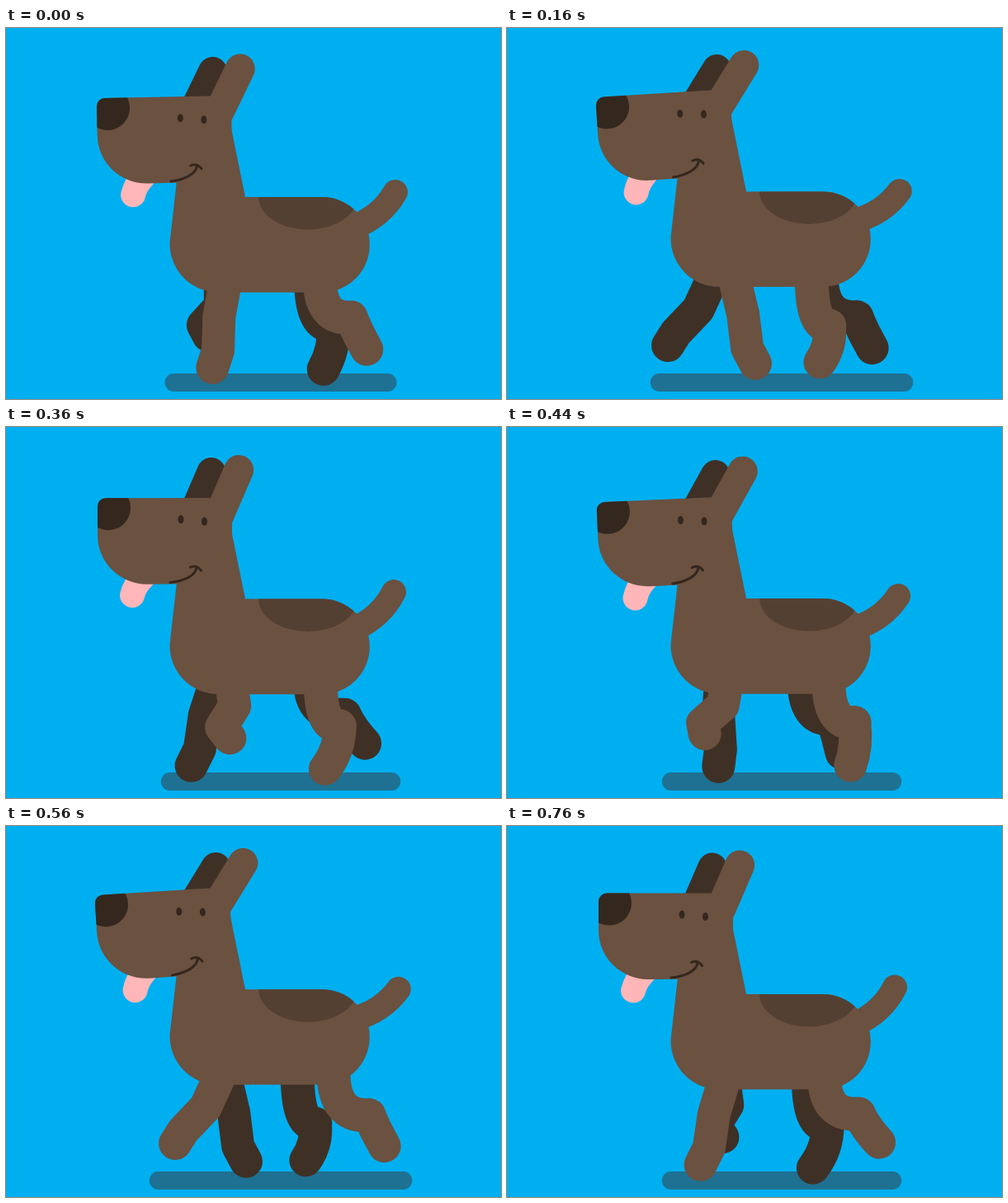
Write an HTML page with a canvas that moves like this. It is 600 by 450 pixels and loops after 800 ms.

```html
<!DOCTYPE html>
<html lang="en">
<head>
<meta charset="utf-8">
<title>Walking dog</title>
<style>
  html, body { margin: 0; width: 100%; height: 100%; overflow: hidden; background: #00aff0; }
  canvas { display: block; }
</style>
</head>
<body>
<canvas id="stage" width="600" height="450"></canvas>
<script>
const ctx = document.getElementById('stage').getContext('2d');
const LOOP = 800, STEP = 40, RAD = Math.PI / 180;
const SKY = '#00aff0', SHADOW = '#1e7192', COAT = '#6b5140', FAR = '#3f3026',
      PATCH = '#544032', INK = '#34271e', TONGUE = '#ffb6b8';

// Cosine that reaches its top when the gait phase, in degrees, equals `peak`.
const wave = (phase, peak) => Math.cos((phase - peak) * RAD);

function stroke(color, width, build) {
  ctx.beginPath();
  build();
  ctx.strokeStyle = color;
  ctx.lineWidth = width;
  ctx.lineCap = ctx.lineJoin = 'round';
  ctx.stroke();
}

function fill(color, build) {
  ctx.beginPath();
  build();
  ctx.fillStyle = color;
  ctx.fill();
}

function ellipse(color, x, y, rx, ry) {
  fill(color, () => ctx.ellipse(x, y, rx, ry, 0, 0, 2 * Math.PI));
}

function within(build, draw) {
  ctx.save();
  ctx.beginPath();
  build();
  ctx.clip();
  draw();
  ctx.restore();
}

function placed(x, y, degrees, draw) {
  ctx.save();
  ctx.translate(x, y);
  ctx.rotate(degrees * RAD);
  draw();
  ctx.restore();
}

// Every joint swings on its own ellipse; `tuck` folds the leg twice per stride.
function frontLeg(color, phase, lift) {
  const tuck = 3 * wave(2 * phase, 216);
  stroke(color, 40, () => {
    ctx.moveTo(270, 290 + lift);
    ctx.lineTo(264 + 25.7 * wave(phase, 103), 344 + 6.5 * wave(phase, 10));
    ctx.lineTo(253 + 39 * wave(phase, 84), 378 + 16 * wave(phase, 18) + tuck);
    ctx.lineTo(253 + 51.4 * wave(phase, 93), 395 + 20 * wave(phase, 15) + tuck);
  });
}

function hindLeg(color, phase, lift) {
  const hipX = 383 + 14 * wave(phase, 259);
  const hockX = 415.5 + 27 * wave(phase, 276), hockY = 356 + 8.6 * wave(phase, 125);
  const pawX = 419 + 51 * wave(phase, 291);
  const pawY = 398 + 17.7 * wave(phase, 133) + 5 * wave(2 * phase, 40);
  const length = Math.hypot(pawX - hockX, pawY - hockY);
  const dx = (pawX - hockX) / length, dy = (pawY - hockY) / length;
  const bow = 5 - 14 * dx;
  stroke(color, 41, () => {
    ctx.moveTo(hipX, 308 + lift);
    ctx.quadraticCurveTo(hipX, hockY + 3, hockX, hockY);
  });
  stroke(color, 40, () => {
    ctx.moveTo(hockX, hockY);
    ctx.quadraticCurveTo((hockX + pawX) / 2 + dy * bow, (hockY + pawY) / 2 - dx * bow, pawX, pawY);
  });
}

function bodyPath() {
  ctx.moveTo(290, 208.5);
  ctx.lineTo(383, 208.5);
  ctx.arc(383, 266.3, 57.8, -Math.PI / 2, Math.PI / 2);
  ctx.lineTo(258, 324.1);
  ctx.bezierCurveTo(223, 324, 198, 296, 198.5, 264);
  ctx.lineTo(207, 188);
  ctx.lineTo(225, 150);
  ctx.lineTo(268, 105);
  ctx.lineTo(271, 115);
  ctx.closePath();
}

function headPath() {
  ctx.moveTo(111, 96);
  ctx.arcTo(111, 86, 121, 86, 10);
  ctx.lineTo(274, 86);
  ctx.lineTo(274, 130);
  ctx.lineTo(262, 160);
  ctx.lineTo(240, 190);
  ctx.lineTo(171, 190.5);
  ctx.bezierCurveTo(138, 190.5, 111, 164, 111, 131);
  ctx.closePath();
}

function ear(color, x, y, width, nod) {
  placed(x, y, 23.3 + 3.3 * nod, () => stroke(color, width, () => {
    ctx.moveTo(0, 0);
    ctx.lineTo(0, -61);
  }));
}

function head(nod) {
  placed(243, 149, -nod, () => {
    ctx.translate(-243, -149);
    ear(FAR, 224.7, 110.5, 35, nod);
    stroke(TONGUE, 30, () => {
      ctx.moveTo(153, 204);
      ctx.quadraticCurveTo(156, 192, 166, 182);
    });
    fill(COAT, headPath);
    ear(COAT, 258, 108, 36, nod);
    within(headPath, () => ellipse(INK, 124, 98, 27, 27));
    ellipse(INK, 212, 112, 3.5, 5);
    ellipse(INK, 240.5, 114.5, 3.5, 5);
    stroke(INK, 3, () => {
      ctx.moveTo(199, 188.5);
      ctx.bezierCurveTo(214, 187, 230, 181, 231, 170);
      ctx.moveTo(223.5, 170);
      ctx.quadraticCurveTo(231, 166.5, 236.5, 174);
    });
  });
}

function tail(nod) {
  placed(425, 238, 2.7 * nod, () => stroke(COAT, 30, () => {
    ctx.moveTo(45, -38);
    ctx.quadraticCurveTo(30, -8, -3, 7);
  }));
}

function shadow(t) {
  const stride = 1 - Math.abs(1 - t % 400 / 200);
  const reach = 129.5 + 23.5 * stride;
  stroke(SHADOW, 22, () => {
    ctx.moveTo(333 - reach, 430);
    ctx.lineTo(333 + reach, 430);
  });
}

function draw(t) {
  const phase = t / LOOP * 360;
  const lift = -6.2 + 2.3 * wave(phase, 160) + 4.95 * wave(2 * phase, 0);
  const nod = 1.8 + 2.2 * wave(2 * phase, 108);

  ctx.fillStyle = SKY;
  ctx.fillRect(0, 0, 600, 450);
  shadow(t);

  // The far legs walk half a stride behind the near ones.
  placed(-16, 0, 0, () => hindLeg(FAR, phase + 180, lift));
  placed(-10, 0, 0, () => frontLeg(FAR, phase + 180, lift));

  placed(0, lift, 0, () => {
    tail(nod);
    fill(COAT, bodyPath);
    within(bodyPath, () => ellipse(PATCH, 366, 208, 60, 40));
    head(nod);
  });

  hindLeg(COAT, phase, lift);
  frontLeg(COAT, phase, lift);
}

const start = performance.now();
function tick() {
  const elapsed = performance.now() - start;
  draw(Math.floor(elapsed / STEP) * STEP % LOOP);
  requestAnimationFrame(tick);
}
tick();
</script>
</body>
</html>
```
